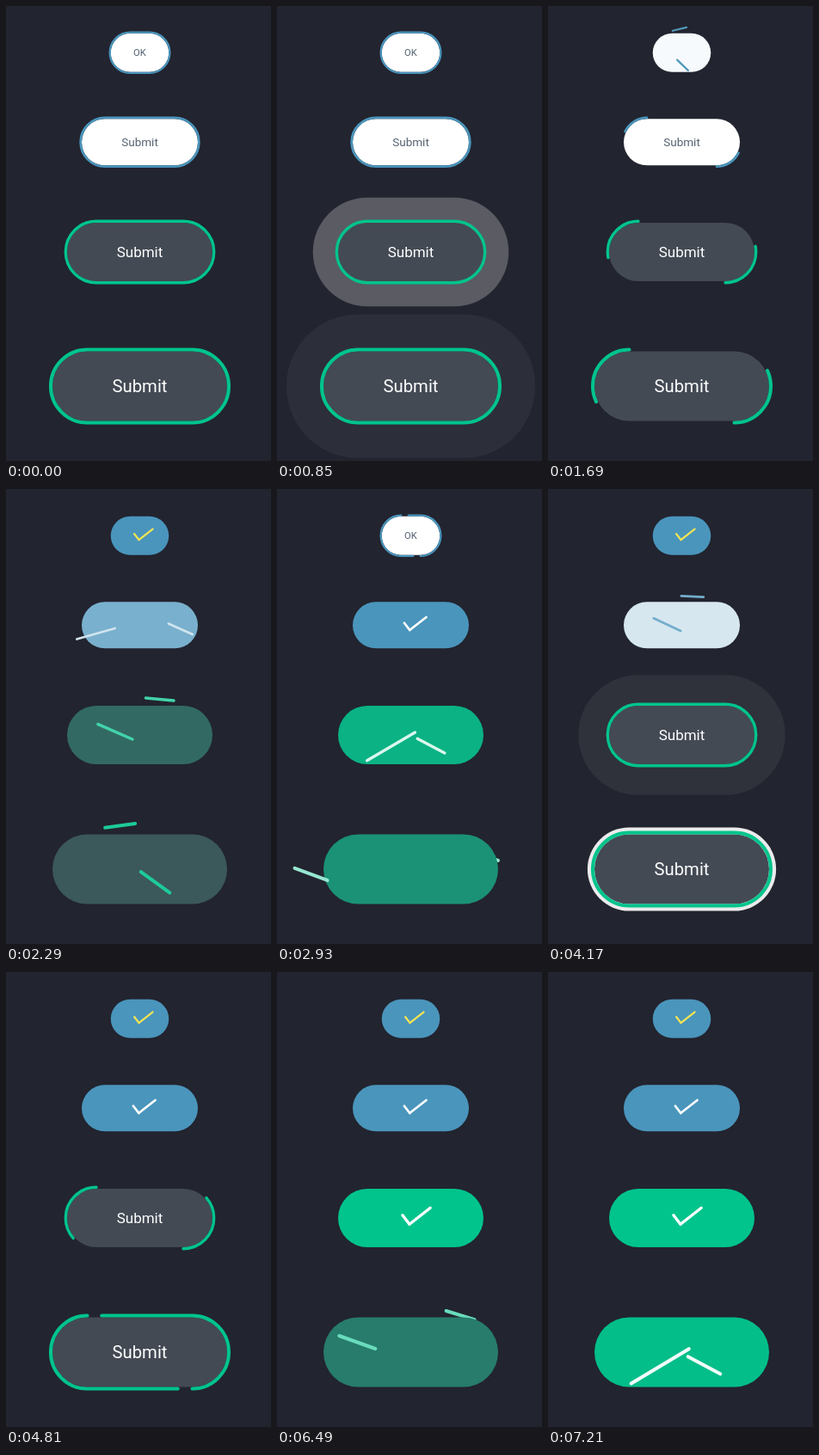
These frames come from a looping animation (308x529 px, 7250 ms). An HTML page:

```html
<!DOCTYPE html>
<html lang="en">
<head>
<meta charset="utf-8">
<title>Submit buttons</title>
<style>
  html, body { margin: 0; width: 100%; height: 100%; overflow: hidden; background: #22242f; }
  svg { display: block; width: 100vw; height: 100vh; }
  text { font-family: Roboto, "Open Sans", sans-serif; text-anchor: middle; }
  path, line { fill: none; stroke-linecap: round; }
</style>
</head>
<body>
<svg id="stage" viewBox="0 0 308 529"></svg>
<script>
const LOOP = 7250, HOLD = 370, STEP = 40;
const UNIT = 81, HALF = 101.5;   // height and half width of the largest button
const RIPPLE_END = 600, SHRINK = 1130, FLY = 1715, FILL = 1800, FILL_TIME = 1340;

const WHITE = [255, 255, 255], BLUE = [74, 149, 188], GREEN = [0, 196, 140];
const SLATE = [67, 74, 84], YELLOW = [243, 228, 84], INK = [84, 98, 112];

// each button runs twice: at first, and again one period later
const buttons = [
  { label: 'OK', y: 54.3, w: 67.5, h: 45, idle: WHITE, done: BLUE, ink: INK, tick: YELLOW, pace: .25, first: 1224, period: 1531 },
  { label: 'Submit', y: 158.3, w: 135, h: 54, idle: WHITE, done: BLUE, ink: INK, tick: WHITE, pace: .47, first: 976, period: 2207 },
  { label: 'Submit', y: 286, w: 169, h: 68, idle: SLATE, done: GREEN, ink: WHITE, tick: WHITE, pace: .8, first: 572, period: 3200 },
  { label: 'Submit', y: 442, w: 203, h: 81, idle: SLATE, done: GREEN, ink: WHITE, tick: WHITE, pace: 1, first: 338, period: 3798 }
];

// time, tail x y, head x y, inset on narrow buttons
const shortLeg = [
  [1715, -61, -43, -56, -43, 1],
  [1864, -60, -46, -31, -53, 1],
  [2100, -1, -51, 38, -49, 0],
  [2353, 41, -48, 74, -38, -.6],
  [2593, 68, -22, 101.5, -10, -1],
  [2750, 60, -6, 102, 12, -.7],
  [2960, 7, 5.5, 44.5, 25.5, 0],
  [3080, 7, 5, 44, 25, 0],
  [3280, -11.4, -3.8, -1.8, 8.6, 0]
];
const longLeg = [
  [1715, 61, 43, 56, 43, -1],
  [1864, 54, 37, 31, 15, -1],
  [2100, -2, 10, -49, -12, 0],
  [2353, -41, -4, -83, -19, .6],
  [2593, -97, 13, -135, -1, 1],
  [2750, -58, 8, -122, 20, .7],
  [2960, 8.5, -4, -58, 36, 0],
  [3080, 8.5, -4, -58, 36, 0],
  [3280, 27, -14, -1.8, 8.6, 0]
];

const stage = document.getElementById('stage');
const clamp = v => Math.max(0, Math.min(1, v));
const mix = (a, b, p) => `rgb(${a.map((v, i) => Math.round(v + (b[i] - v) * p))})`;
const rgb = c => `rgb(${c})`;

function set(el, attrs) {
  for (const k in attrs) el.setAttribute(k, attrs[k]);
}
function add(parent, tag, attrs) {
  const el = document.createElementNS(stage.namespaceURI, tag);
  set(el, attrs);
  parent.appendChild(el);
  return el;
}
function show(el, on) {
  el.setAttribute('visibility', on ? 'visible' : 'hidden');
}
function pill(b, grow) {
  const w = b.w + grow * 2, h = b.h + grow * 2;
  return { x: -w / 2, y: -h / 2, width: w, height: h, rx: h / 2 };
}

// smooth curve through the keys
function sample(keys, n) {
  const last = keys.length - 1;
  if (n >= keys[last][0]) return keys[last].slice(1);
  let i = 0;
  while (i < last - 1 && n >= keys[i + 1][0]) i++;
  const a = keys[i], b = keys[i + 1], p = keys[i - 1] || a, q = keys[i + 2] || b;
  const d = b[0] - a[0], u = clamp((n - a[0]) / d);
  const slope = (l, r, k) => (r[k] - l[k]) / (r[0] - l[0]) * d;
  return [1, 2, 3, 4, 5].map(k => {
    const m0 = slope(p, b, k), m1 = q === b ? 0 : slope(a, q, k), c = b[k] - a[k];
    return a[k] + u * (m0 + u * (3 * c - 2 * m0 - m1 + u * (m0 + m1 - 2 * c)));
  });
}

function build(b) {
  const g = add(stage, 'g', { transform: `translate(155.5 ${b.y})` });
  const stroke = b.h / 20, r = b.h / 2 + stroke / 2, x = b.w / 2 - b.h / 2;
  b.ripple = add(g, 'rect', { fill: '#fff' });
  b.back = add(g, 'line', { 'stroke-width': stroke });
  b.face = add(g, 'rect', pill(b, 0));
  b.border = add(g, 'path', {
    d: `M${-x} ${-r}A${r} ${r} 0 0 0 ${-x} ${r}H${x}A${r} ${r} 0 0 0 ${x} ${-r}Z`,
    pathLength: 2, stroke: rgb(b.done), 'stroke-width': stroke
  });
  b.text = add(g, 'text', { y: b.h * .0885, 'font-size': b.h / 4, fill: rgb(b.ink) });
  b.text.textContent = b.label;
  b.front = add(g, 'line', { 'stroke-width': stroke });
  b.long = add(g, 'line', { 'stroke-width': stroke });
}

function place(el, b, keys, n, stroke) {
  const k = b.h / UNIT;
  const [x1, y1, x2, y2, c] = sample(keys, n);
  const inset = c * (HALF - b.w / 2 / k);
  set(el, { x1: (x1 + inset) * k, y1: y1 * k, x2: (x2 + inset) * k, y2: y2 * k, stroke });
}

function draw(b, t) {
  const again = b.first + b.period;
  const n = (t - (t < again ? b.first : again)) / b.pace;

  const spread = 1 - Math.pow(1 - clamp(n / RIPPLE_END), 1.6);
  set(b.ripple, { ...pill(b, (4.5 + 40.5 * spread) * b.h / UNIT), opacity: 1 - spread });
  show(b.ripple, n >= 0 && n < RIPPLE_END);

  const dash = 1 - clamp((n - RIPPLE_END) / SHRINK);
  b.border.setAttribute('stroke-dasharray', dash < 1 ? `${dash} ${1 - dash}` : 'none');
  show(b.border, n < FLY);

  const fill = clamp((n - FILL) / FILL_TIME);
  b.face.setAttribute('fill', mix(b.idle, b.done, fill));
  b.text.setAttribute('opacity', 1 - clamp((n - 1640) / 180));

  const color = mix(b.done, b.tick, fill), flying = n >= FLY, behind = n < 2700;
  place(b.back, b, shortLeg, n, color);
  place(b.front, b, shortLeg, n, color);
  place(b.long, b, longLeg, n, color);
  show(b.back, flying && behind);
  show(b.front, flying && !behind);
  show(b.long, flying);
}

buttons.forEach(build);
const start = performance.now();
function play() {
  const now = (performance.now() - start) % LOOP;
  const t = now < HOLD ? 0 : HOLD + Math.floor((now - HOLD) / STEP) * STEP;
  buttons.forEach(b => draw(b, t));
  requestAnimationFrame(play);
}
play();
</script>
</body>
</html>
```
